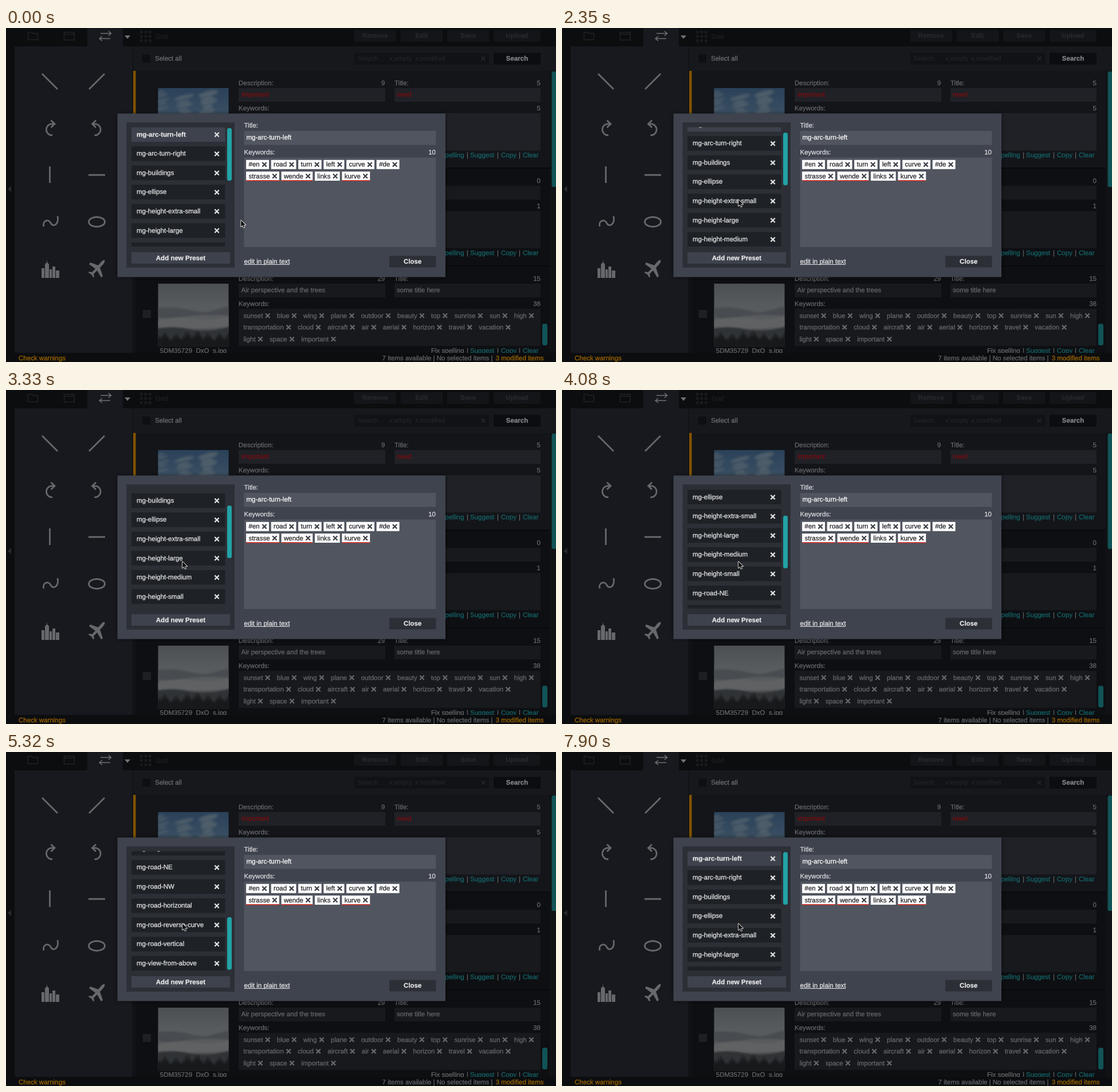
An HTML page with a canvas that plays this animation: 960 px wide and 584 px high, repeating every 8000 ms.

```html
<!DOCTYPE html>
<html lang="en">
<head>
<meta charset="utf-8">
<title>Keyword presets</title>
<style>
html, body { margin: 0; height: 100%; overflow: hidden; background: #0c0d0f; }
canvas { display: block; }
</style>
</head>
<body>
<canvas id="stage" width="960" height="584"></canvas>
<script>
const ctx = document.getElementById('stage').getContext('2d');
ctx.textRendering = 'geometricPrecision';

const LOOP = 8000;
const FONT = '11.52px "Liberation Sans", Arial, sans-serif';
const DIM = '#66686c', FAINT = '#232529', TEAL = '#15666a', DARK_TEAL = '#115356', ORANGE = '#a06800';
const PANEL = '#17191e', DARK = '#0c0d0f';
const ACTIVE_ROW = { bg: '#131519', field: '#1f2126', spelling: TEAL };
const IDLE_ROW = { bg: '#0e0f12', field: '#17191c', spelling: TEAL };

const presets = ['arc-turn-left', 'arc-turn-right', 'buildings', 'ellipse', 'height-extra-small',
  'height-large', 'height-medium', 'height-small', 'road-NE', 'road-NW', 'road-horizontal',
  'road-reverse-curve', 'road-vertical', 'view-from-above'].map(name => 'mg-' + name);

// [time, x, y]
const cursorKeys = [[0, 409.7, 335.7], [1160, 400, 328], [1340, 372, 318], [1430, 328, 304], [1520, 307.5, 299.5]];

// [time, scroll offset]
const scrollKeys = [[0, 0], [1790, 1], [1960, 3],
  [2230, 6], [2350, 18], [2470, 30], [2590, 35],
  [3120, 41], [3230, 60], [3340, 84], [3450, 97],
  [4080, 99.7], [4190, 122], [4300, 131], [4420, 134],
  [4960, 136], [5080, 170], [5200, 220], [5320, 253],
  [7060, 248.5], [7180, 216], [7300, 168], [7420, 140], [7900, 0]];

const hold = (keys, t) => keys.findLast(key => key[0] <= t).slice(1);

function box(color, left, top, right, bottom) {
  ctx.fillStyle = color;
  ctx.fillRect(left, top, right - left, bottom - top);
}

function pill(color, left, top, right, bottom) {
  ctx.fillStyle = color;
  ctx.beginPath();
  ctx.roundRect(left, top, right - left, bottom - top, 3.5);
  ctx.fill();
}

// y is the middle of the line; the hairline outline thickens the glyphs a little
function text(str, x, y, color = DIM, { bold = false, align = 'left' } = {}) {
  ctx.font = (bold ? 'bold ' : '') + FONT;
  ctx.textAlign = align;
  ctx.fillStyle = ctx.strokeStyle = color;
  ctx.lineWidth = 0.25;
  ctx.fillText(str, x, y + 3.6);
  ctx.strokeText(str, x, y + 3.6);
}

function stroke(path, color = DIM, width = 2.5) {
  ctx.strokeStyle = color;
  ctx.lineWidth = width;
  ctx.stroke(new Path2D(path));
}

function fill(path, color = DIM) {
  ctx.fillStyle = color;
  ctx.fill(new Path2D(path));
}

function cross(x, y, color, r = 3.7, width = 2.3) {
  stroke(`M${x - r} ${y - r}L${x + r} ${y + r}M${x + r} ${y - r}L${x - r} ${y + r}`, color, width);
}

function clipped(left, top, right, bottom, draw) {
  ctx.save();
  ctx.beginPath();
  ctx.rect(left, top, right - left, bottom - top);
  ctx.clip();
  draw();
  ctx.restore();
}

function button(label, left, top, right, bottom, bg, color) {
  box(bg, left, top, right, bottom);
  text(label, (left + right) / 2, (top + bottom) / 2, color, { bold: true, align: 'center' });
}

// A trailing "!" marks a misspelled word.
function tags(words, x, y, color, crossColor, bg) {
  for (const word of words.split(' ')) {
    const label = word.replace('!', '');
    ctx.font = FONT;
    const crossX = x + ctx.measureText(label).width + 8.3;
    if (bg) {
      box(bg, x - 4.4, y - 8, crossX + 8, y + 8);
      if (label !== word) box('#e03028', x - 4.4, y + 7, crossX + 8, y + 8.5);
    }
    text(label, x, y, color);
    cross(crossX, y, crossColor);
    x = crossX + 16.1;
  }
}

function gradient(top, bottom, ...colors) {
  const g = ctx.createLinearGradient(0, top, 0, bottom);
  colors.forEach((c, i) => g.addColorStop(i / (colors.length - 1), c));
  return g;
}

function skyPhoto() {
  clipped(265.5, 105, 388.5, 216, () => {
    box(gradient(105, 150, '#2a4159', '#3a4f62'), 265, 105, 389, 216);
    ctx.filter = 'blur(2px)';
    ctx.fillStyle = '#4f5e6a';
    for (let i = 0; i < 15; i++) {
      ctx.beginPath();
      ctx.ellipse(268 + i * 41 % 122, 113 + i * 17 % 37, 9 + i % 4 * 3, 2 + i % 3 * 1.4, -0.25, 0, 7);
      ctx.fill();
    }
  });
}

function mistPhoto() {
  clipped(265.5, 447, 388.5, 558, () => {
    box(gradient(447, 558, '#4b4f53', '#585b5d', '#595b5d', '#17191b'), 265, 447, 389, 558);
    ctx.filter = 'blur(1.5px)';
    fill('M262 490Q290 486 315 492T350 497L392 486V503Q340 499 310 505T262 504Z', '#484c50');
    fill('M262 512Q300 503 330 508T392 503V522Q330 528 262 524Z', '#5f6163');
    fill('M262 526Q290 520 320 527T392 522V562H262Z', '#303336');
    ctx.filter = 'none';
    ctx.fillStyle = '#17191b';
    for (let x = 265; x < 389; x += 3) {
      const top = 534 + 5 * Math.sin(x * 12.9) + 3 * Math.sin(x / 11);
      ctx.beginPath();
      ctx.moveTo(x - 3, 558);
      ctx.lineTo(x, top);
      ctx.lineTo(x + 4, 558);
      ctx.fill();
    }
  });
}

function itemRow(top, [descCount, titleCount, keyCount], { bg, field, spelling }) {
  const right = { align: 'right' };
  box(bg, 227, top, 949, top + 169);
  box('#08090a', 227, top + 169, 949, top + 171);
  text('Description:', 406, top + 21);
  text(descCount, 661.5, top + 21, DIM, right);
  text('Title:', 678, top + 21);
  text(titleCount, 933, top + 21, DIM, right);
  text('Keywords:', 406, top + 65);
  text(keyCount, 933, top + 65, DIM, right);
  box(field, 406, top + 30, 662, top + 54);
  box(field, 678, top + 30, 933, top + 54);
  box(field, 406, top + 74, 933, top + 139);
  const y = top + 147;
  text('Fix spelling', 742, y, spelling);
  text('Suggest', 810, y, TEAL);
  text('Copy', 864, y, TEAL);
  text('Clear', 902, y, TEAL);
  for (const x of [804, 857, 895]) text('|', x, y);
}

function topBar() {
  box(PANEL, 142, 0, 204, 33);
  stroke('M38.5 20.5V7.5H45L47 9.5H55.5V20.5ZM101.5 7.5H119V21H101.5ZM101.5 11H119', '#202226', 1.5);
  stroke('M165 9.5H183M179 5.5L183.5 9.5L179 13.5M182 18.5H164M168 14.5L163 18.5L168 22.5', '#707276', 1.5);
  fill('M207 13H217L212 19Z', '#707276');
  for (let i = 0; i < 9; i++) {
    const x = 234 + i % 3 * 7.5, y = 5 + Math.floor(i / 3) * 7.5;
    box('#1a1c1f', x, y, x + 4.5, y + 4.5);
  }
  text('Grid', 261, 15, '#202226');
  ['Remove', 'Edit', 'Save', 'Upload'].forEach((label, i) =>
    button(label, 607.5 + i * 81.2, 3.5, 681 + i * 81.2 + (i === 3 ? 8 : 0), 24, '#131519', '#27292d'));
}

function sidebar() {
  box(PANEL, 15, 32, 221, 568);
  fill('M9 276V287L3 281.5Z', '#292b2f');
  stroke('M63 80L90 107M145 107L172 80', DIM, 2.8);
  const turn = 'M81 187.5A10 10 0 0 1 78 167.8H84M78.5 161.5L85 167.8L78.5 174';
  stroke(turn, DIM, 2.8);
  ctx.save();
  ctx.translate(235.5, 0);
  ctx.scale(-1, 1);
  stroke(turn, DIM, 2.8);
  ctx.restore();
  stroke('M76.5 242V271M144 257H173', DIM, 2.8);
  stroke('M66 347C63 337 74 333 78 341S93 344 90 329', DIM, 2.8);
  stroke('M144.5 339A14 8.5 0 1 0 172.5 339A14 8.5 0 1 0 144.5 339', DIM, 2.8);
  fill('M62 420H67V437H62ZM68 413L71 410V405L72 410L75 413V437H68ZM76 422H80V437H76ZM81 417H86V437H81ZM87 424H93V437H87Z');
  fill('M172 406Q174 408 168 415L164 419L169 434L166 436L159 424L153 430L154 435L152 436L149 431L144 428L145 426L150 427L156 421L145 413L147 410L161 415L166 409Q171 404 172 406Z');
}

function page() {
  box(DARK, 0, 0, 960, 584);
  topBar();
  sidebar();
  box('#16181c', 222, 32, 960, 75);
  box('#0e0f12', 238, 46.5, 252, 60.5);
  text('Select all', 260, 53, '#6e7074');
  box('#101216', 608, 43.5, 843, 64);
  text('Search...', 613, 53.5, FAINT);
  text('x:empty', 669, 53.5, FAINT);
  text('x:modified', 714, 53.5, FAINT);
  cross(833, 53.5, FAINT, 3.5, 1.8);
  button('Search', 851, 43.5, 933, 64, '#0c0d10', '#85878a');

  clipped(222, 75, 960, 568, () => {
    box('#101215', 222, 75, 960, 568);
    itemRow(75, ['9', '5', '5'], ACTIVE_ROW);
    itemRow(246, ['0', '0', '1'], IDLE_ROW);
    itemRow(417, ['29', '15', '38'], { ...IDLE_ROW, spelling: DIM });
    box('#825400', 221.5, 75, 226.5, 245);
    skyPhoto();
    mistPhoto();
    text('important', 411, 116, '#7c0d10');
    text('need', 682, 116, '#7c0d10');
    box('#1d1f22', 238.5, 493, 253, 507);
    text('Air perspective and the trees', 410.5, 458.5);
    text('some title here', 682, 458.5);
    tags('sunset blue wing plane outdoor beauty top sunrise sun high', 414.5, 503, DIM, DIM);
    tags('transportation cloud aircraft air aerial horizon travel vacation', 414.5, 523.3, DIM, DIM);
    tags('light space important', 414.5, 544, DIM, DIM);
    text('5DM35729_DxO_s.jpg', 327, 564, DIM, { align: 'center' });
    pill(DARK_TEAL, 936, 517, 945, 555);
    pill(DARK_TEAL, 952.5, 76, 961, 278);
  });

  text('Check warnings', 22, 577.5, ORANGE);
  text('7 items available | No selected items |', 849.5, 577.5, DIM, { align: 'right' });
  text('3 modified items', 938.5, 577.5, ORANGE, { align: 'right' });
}

function presetList(offset) {
  box('#2c2f36', 210.5, 165, 399, 419);
  clipped(211, 173.5, 399, 382, () => presets.forEach((name, i) => {
    const y = 186.2 + i * 33.55 - offset, selected = i === 0;
    box(selected ? '#3e424c' : '#1e2126', 219, y - 12.7, 382.5, y + 12.8);
    text(name, 228, y, '#e6e7e8', { bold: selected });
    cross(368, y + 0.3, '#dfe0e1');
  }));
  const barTop = 175 + offset * 0.45;
  pill('#22a2a5', 386, barTop, 394, barTop + 92);
  button('Add new Preset', 219, 392, 391, 412, '#3e424c', '#e6e7e8');
}

function dialog(offset) {
  ctx.save();
  ctx.shadowColor = 'rgba(0,0,0,.6)';
  ctx.shadowBlur = 7;
  box('#3f434e', 194.5, 149.5, 767, 435.5);
  ctx.restore();
  presetList(offset);
  text('Title:', 415.5, 170, '#dcdddf');
  box('#50555f', 415.5, 180, 750.5, 204.5);
  text('mg-arc-turn-left', 419.5, 191.5, '#fff');
  text('Keywords:', 415.5, 217, '#dcdddf');
  text('10', 750, 217, '#dcdddf', { align: 'right' });
  box('#50555f', 415.5, 226.5, 750.5, 383);
  tags('#en road turn left curve #de', 423.5, 238.7, '#222428', '#3c4048', '#fff');
  tags('strasse! wende! links kurve!', 423.5, 259, '#222428', '#3c4048', '#fff');
  text('edit in plain text', 415.5, 408, '#e6e7e8');
  box('#e6e7e8', 415.5, 413, 495, 414);
  button('Close', 669, 398.5, 750.5, 418.5, '#2c2f36', '#e6e7e8');
}

function cursor(x, y) {
  ctx.save();
  ctx.translate(x, y);
  const arrow = 'M0.5 0.5V11.8L3.1 9.3L4.9 13.3L6.6 12.6L4.9 8.7H8.6Z';
  ctx.lineJoin = 'round';
  stroke(arrow, '#fff', 1.5);
  fill(arrow, '#111');
  ctx.restore();
}

function frame() {
  const t = performance.now() % LOOP;
  page();
  dialog(hold(scrollKeys, t)[0]);
  cursor(...hold(cursorKeys, t));
  requestAnimationFrame(frame);
}
frame();
</script>
</body>
</html>
```
